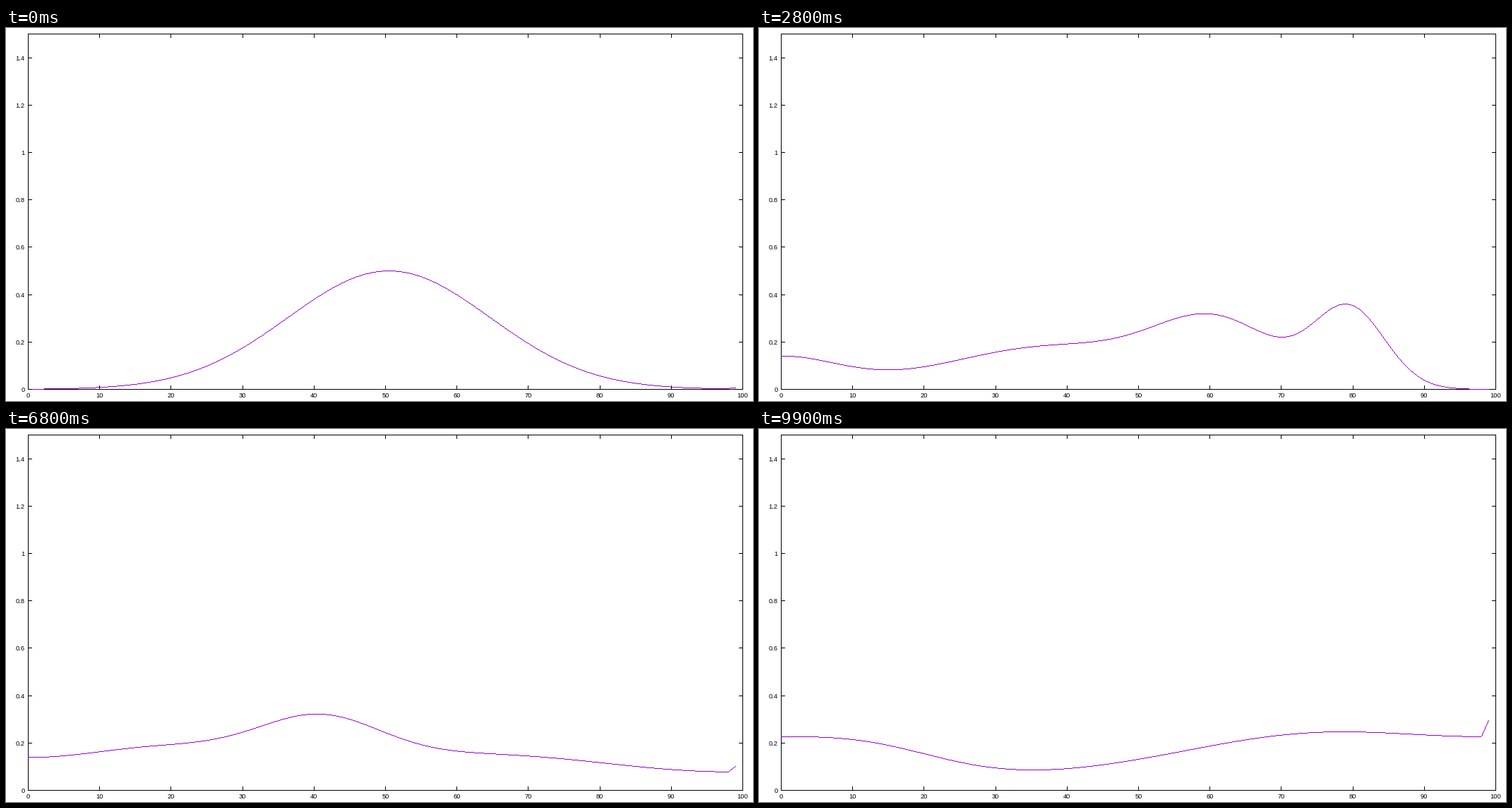
A matplotlib script for the animation above (10000 ms loop, 1058 by 529 pixels).

```python
import numpy as np
import matplotlib.pyplot as plt
from matplotlib.animation import FuncAnimation
from matplotlib.collections import LineCollection

W, H, DPI = 1058, 529, 100
LEFT, RIGHT, TOP, BOTTOM = 31.5, 1043.5, 8.5, 512.5
PX = 72 / DPI
FRAMES = 100

X = np.arange(100.0)
WALL = 98.5
HIT, PART = 12, 18  # full impact at the right wall, beams fully parted

# Rebounding beams: mass, time at left wall, speed in, speed out,
# width at that start time of reference, growth of width
BEAMS = [
    (4.15, 110, 0.97, 1.0, 5.0, 0.09),
    (5.5, 58.5, 2.0, 1.9, 8.5, 0.13),
    (6.8, 40.7, 3.0, 2.2, 15.0, 0.15),
    (1.35, 28, 5.2, 3.0, 8.5, 0.25),
]


def bell(x, center, width):
    return np.exp(-(x - center) ** 2 / (2 * width ** 2))


def pulse(x, t):
    """Free pulse moving right, with its center at the wall at HIT."""
    return 0.5 * bell(x, 50.5 + 4 * t, np.sqrt(200))


def impact():
    return 1.42 * np.exp(-(np.abs(97.5 - X) / 12.3) ** 1.4)


def approach(t):
    """Pulse plus the mass past the wall, piled up in front of it."""
    beyond = np.arange(99, 250)
    overrun = pulse(beyond, t).sum() / pulse(beyond, HIT).sum()
    reach = 0.25 + 0.75 * t / HIT
    pile = np.maximum(impact() - pulse(X, HIT), 0)
    return pulse(X, t) + overrun / reach * np.interp(WALL - (WALL - X) / reach, X, pile)


def beams(t):
    """Spreading beams, each mirrored at both walls."""
    y = np.zeros_like(X)
    for mass, turn, v_in, v_out, width, growth in BEAMS:
        d = t - turn
        c = -v_in * d if d < 0 else v_out * d
        c = abs(2 * WALL - c) if c > WALL else c
        s = width + growth * (t - 28)
        images = sum(bell(X, m, s) for m in (c, -c, 2 * WALL - c))
        y += mass / (np.sqrt(2 * np.pi) * s) * images
    return y


def transport(a, b, u):
    """Move the mass of a to b along straight paths."""
    fine = np.linspace(0, 99, 991)
    q = np.linspace(0, 1, 20001)
    xs, mass = 0, 0
    for y, w in ((a, 1 - u), (b, u)):
        total = np.cumsum(np.interp(fine, X, y))
        xs = xs + w * np.interp(q, total / total[-1], fine)
        mass += w * total[-1] * 0.1
    return mass * (np.interp(X + 0.5, xs, q) - np.interp(X - 0.5, xs, q))


def density(t):
    if t <= HIT:
        y = approach(t)
    elif t < PART:
        y = transport(impact(), beams(PART), (t - HIT) / (PART - HIT))
    else:
        y = beams(t)
    y[-1] = 1.3 * y[-2]  # the wall cell always overshoots
    return y


def px(x):
    return LEFT + (RIGHT - LEFT) * x / 100


def py(y):
    return BOTTOM - (BOTTOM - TOP) * y / 1.5


def pixel_runs(y):
    """One vertical run of whole pixels per column, for a hard-edged line."""
    cols = np.arange(int(px(0)), int(px(99)) + 1)
    value = np.interp(cols + 0.5, px(X), y)
    a, b = (py(np.interp(cols + e, px(X), y)) for e in (0, 1))
    lo = np.floor(np.minimum(a, b) + 0.5)
    hi = np.floor(np.maximum(a, b) + 0.5)
    flat = lo == hi
    lo[flat] = np.floor(py(value[flat]))
    hi[flat] = lo[flat] + 1
    lo = np.maximum(lo, TOP - 0.5)
    keep = (value > 3e-4) & (hi > lo)
    return [[(c + 0.5, p), (c + 0.5, q)]
            for c, p, q in zip(cols[keep], lo[keep], hi[keep])]


fig = plt.figure(figsize=(W / DPI, H / DPI), dpi=DPI, facecolor="white")
ax = fig.add_axes([0, 0, 1, 1])
ax.set_xlim(0, W)
ax.set_ylim(H, 0)
ax.axis("off")


def rule(xs, ys, zorder=3):
    xs, ys = np.floor(xs) + 0.5, np.floor(ys) + 0.5
    ax.plot(xs, ys, color="black", lw=PX, zorder=zorder, snap=False,
            solid_capstyle="projecting", solid_joinstyle="miter")


def label(x, y, text, ha):
    ax.text(x, y, text, ha=ha, va="center_baseline", color="black",
            family="Liberation Sans", fontsize=9.3 * PX)


rule([LEFT, RIGHT, RIGHT, LEFT, LEFT], [TOP, TOP, BOTTOM, BOTTOM, TOP], zorder=1)
for n in range(0, 101, 10):
    x = px(n)
    rule([x, x], [BOTTOM, BOTTOM - 5])
    rule([x, x], [TOP, TOP + 5])
    label(x, 520.5, str(n), "center")
for n in range(8):
    y = py(n / 5)
    rule([LEFT, LEFT + 5], [y, y])
    rule([RIGHT, RIGHT - 5], [y, y])
    label(26.5, y, f"{n / 5:g}", "right")

curve = LineCollection([], colors="#9400d3", linewidths=PX, capstyle="butt",
                       snap=False, zorder=2)
ax.add_collection(curve, autolim=False)


def draw(i):
    curve.set_segments(pixel_runs(density(i)))
    return curve,


anim = FuncAnimation(fig, draw, frames=FRAMES, interval=100, repeat=True,
                     repeat_delay=0, blit=False)
plt.show()
```
